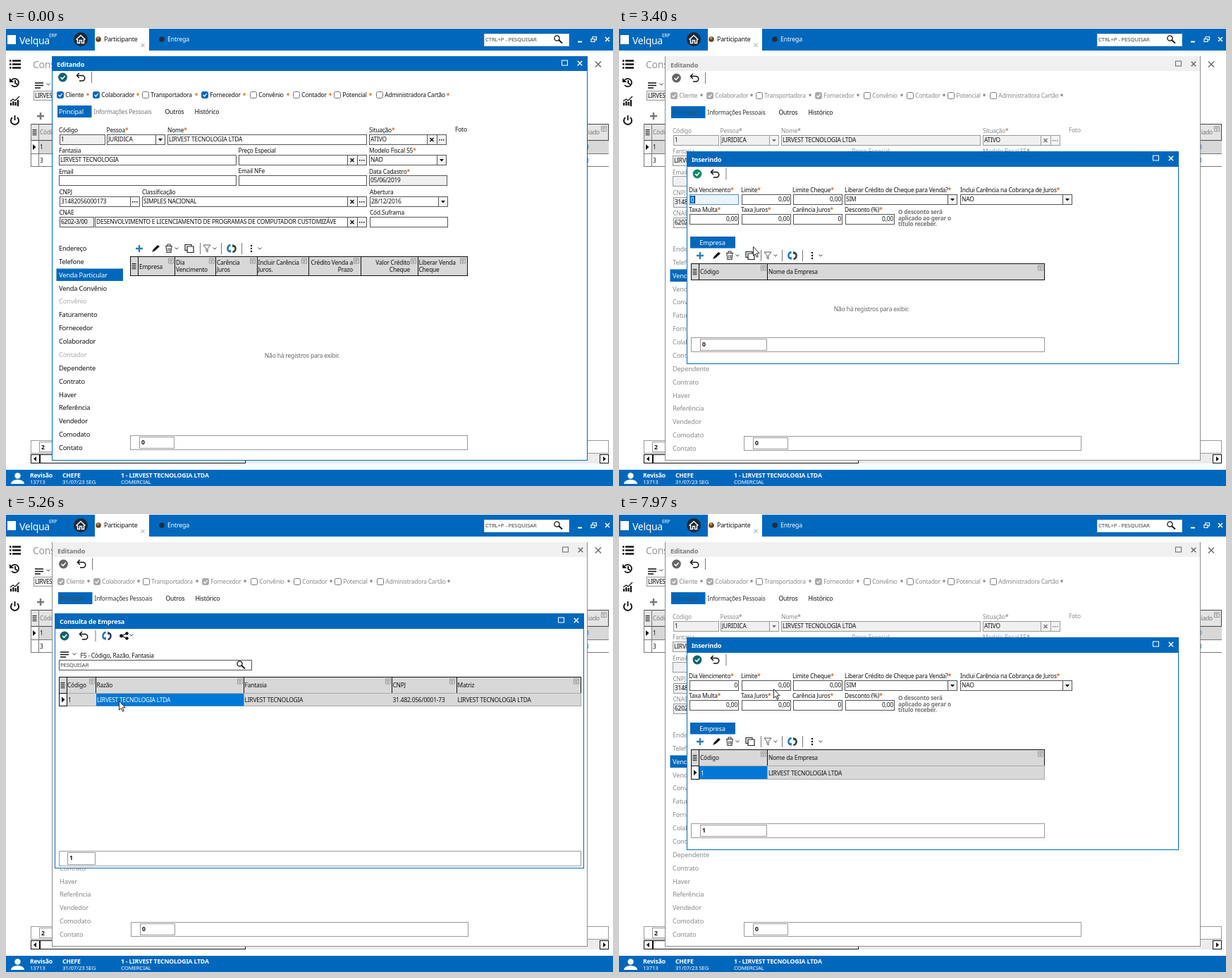
Recreate the animation shown at these times as an HTML page. Size 861 px wide and 650 px high, loop 8000 ms.

```html
<!DOCTYPE html>
<html lang="pt-BR">
<head>
<meta charset="utf-8">
<title>ERP</title>
<style>
html, body { margin: 0; width: 100%; height: 100%; overflow: hidden; background: #fff; }
svg { display: block; width: 861px; height: 650px; }
text { font-family: "Noto Sans", sans-serif; letter-spacing: -.022em; white-space: pre; }
</style>
</head>
<body>
<svg id="stage" viewBox="0 0 861 650" xmlns="http://www.w3.org/2000/svg"></svg>
<script>
const BLUE = '#0068bc', INK = '#111', GREY = '#8a8a8a', HEAD = '#d8d8d8';
const COMPANY = 'LIRVEST TECNOLOGIA', FULL = COMPANY + ' LTDA';

// ---- primitives ----
function text(x, y, s, { size = 8.4, fill = INK, bold = 0, anchor = 'start', star = '#d4691e' } = {}) {
  const body = s.replace(/\*$/, `<tspan fill="${star}" font-weight="700">*</tspan>`);
  return `<text x="${x}" y="${y}" font-size="${size}" fill="${fill}" font-weight="${bold ? 700 : 400}" text-anchor="${anchor}">${body}</text>`;
}
const fillBox = (x1, y1, x2, y2, fill) =>
  `<rect x="${x1}" y="${y1}" width="${x2 - x1}" height="${y2 - y1}" fill="${fill}"/>`;
const box = (x1, y1, x2, y2, stroke = '#555', fill = '#fff', r = 0) =>
  `<rect x="${x1 + .5}" y="${y1 + .5}" width="${x2 - x1 - 1}" height="${y2 - y1 - 1}" rx="${r}" fill="${fill}" stroke="${stroke}"/>`;
const line = (d, stroke = INK, w = 1) => `<path d="${d}" fill="none" stroke="${stroke}" stroke-width="${w}"/>`;
const shape = (d, fill = INK) => `<path d="${d}" fill="${fill}"/>`;
const dot = (x, y, r, fill) => `<circle cx="${x}" cy="${y}" r="${r}" fill="${fill}"/>`;
const at = (x, y, s, opacity = 1) => `<g transform="translate(${x} ${y})" opacity="${opacity}">${s}</g>`;

// ---- icons, centred on x, y ----
const cross = (x, y, r, c = INK, w = 1.5) => line(`M${x - r} ${y - r}l${2 * r} ${2 * r}m0 ${-2 * r}l${-2 * r} ${2 * r}`, c, w);
const chevron = (x, y) => line(`M${x - 2.5} ${y - 1.5}l2.5 2.5 2.5-2.5`, '#444');
const plus = (x, y, c, r = 5) => line(`M${x - r} ${y}h${2 * r}M${x} ${y - r}v${2 * r}`, c, 2.4);
const sep = (x, y, h = 16) => line(`M${x + .5} ${y - h / 2}v${h}`, '#777');
const lens = (x, y) => at(x, y, `<circle cx="-1.5" cy="-1.5" r="3.6" fill="none" stroke="${INK}" stroke-width="1.3"/>` + line('M1 1l5 4.5', INK, 1.8));
const menu = (x, y) => line(`M${x} ${y}h12M${x} ${y + 3.5}h12M${x} ${y + 7}h8`, INK, 1.6);
const check = (x, y, c) => dot(x, y, 6.4, c) + line(`M${x - 3} ${y}l2.3 2.3 4-4.3`, '#fff', 1.5);
const undo = (x, y) => at(x, y, line('M-5-2.5H2a3.5 3.5 0 0 1 0 7.5H-2', INK, 1.5) + line('M-2.2-6l-3.3 3.5 3.3 3.5', INK, 1.5));
const funnel = (x, y) => line(`M${x - 3.5} ${y - 3.5}h7v7h-7zM${x - 2} ${y - 1.5}h4l-2 2v2z`, '#888', .8);
const rowMark = (x, y) => line(`M${x - 3} ${y - 3.5}h6m-6 2.4h6m-6 2.4h6m-6 2.4h6`, INK);
const pointer = (x, y) => shape(`M${x - 2} ${y - 4}l4.5 4-4.5 4z`);
const refresh = (x, y, on = 1) => at(x, y,
  line('M-1.5-5A5 5 0 0 0-3 4.3', on ? '#1b6fb5' : '#555', 2.3) + line('M1.5 5A5 5 0 0 0 3-4.3', on ? '#23384d' : '#555', 2.3) +
  shape('M-6 2.5l5-.5-.5 4.5z', on ? '#1b6fb5' : '#555') + shape('M6-2.5l-5 .5.5-4.5z', on ? '#23384d' : '#555'));

function tools(x, y, hot) {
  return at(x, y,
    (hot ? `<g id="${hot}">${fillBox(-12, -8, 12, 8, '#1b4f83')}</g>` : '') +
    plus(0, 0, '#2b7cbc') +
    shape('M18 5l2-4 6-6 3 2-6.5 6z') +
    line('M37-3.5h10M40-4v-2h4v2M38-3l1 8.5h6L46-3M41-1v5M43.5-1v5', '#333', 1.1) + chevron(53, 0) +
    line('M68.5 2.5h-3.5v-8h9v2.5', '#222', 1.2) + line('M68-3h9v8.5h-9z', '#222', 1.2) +
    sep(86, 0) + line('M91-5h10l-4 5v5l-2-1.5V0z', '#555') + chevron(107, 0) + sep(116, 0) +
    refresh(131, 0) + sep(145, 0) +
    [-4, 0, 4].map(v => dot(159, v, 1.2, INK)).join('') + chevron(171, 0));
}

// ---- widgets ----
const button = (x1, y, x2, c) => box(x1, y, x2, y + 15, c, '#f4f4f4');
function field(x1, y, x2, value = '', kind = '', on = true) {
  const c = on ? '#555' : '#999', ink = on ? INK : '#777';
  let s = box(x1, y, x2, y + 15, c, on && kind !== 'locked' ? '#fff' : '#f0f0f0');
  if (kind === 'num') return s + text(x2 - 2, y + 10.3, value, { anchor: 'end' });
  s += text(x1 + 2, y + 10.3, value);
  if (kind === 'combo') s += button(x2 - 14, y, x2, c) + shape(`M${x2 - 10} ${y + 6}h6l-3 3.5z`, ink);
  if (kind === 'pick' || kind === 'dots') {
    s += button(x2 - 14, y, x2, c) + [-3, 0, 3].map(v => fillBox(x2 - 8 + v, y + 7, x2 - 6.5 + v, y + 8.5, ink)).join('');
    if (kind === 'pick') s += button(x2 - 28, y, x2 - 13, c) + cross(x2 - 21, y + 7.5, 2.5, ink);
  }
  return s;
}
function dialog(x1, y1, x2, y2, bar, title, on) {
  const c = on ? '#fff' : '#666', d = on ? 0 : 1;
  return box(x1, y1, x2, y2, on ? BLUE : '#8c8c8c') +
    fillBox(x1 + 1, y1, x2 - 1, y1 + bar, on ? BLUE : '#f0f0f0') +
    at(d, d, text(x1 + 7, y1 + 15, title, { size: 9.2, bold: 1, fill: on ? '#fff' : '#7a7a7a' }) +
      box(x2 - 37, y1 + 5.5, x2 - 28, y1 + 13.5, c, 'none') + cross(x2 - 11, y1 + 10, 3.2, c));
}
function header(x1, y1, x2, y2, cols, filters) {
  const lines = cols.map(x => `M${x + .5} ${y1}V${y2}`).join('');
  return box(x1, y1, x2, y2, INK, HEAD) + line(lines) + rowMark(x1 + 5.5, (y1 + y2) / 2) +
    filters.map(x => funnel(x, y1 + 6.5)).join('');
}
const footer = (x1, y1, x2, y2, a, b, n) => box(x1, y1, x2, y2, '#999') +
  (n ? box(a, y1 + 2, b, y2 - 2, '#999') + text(a + 3, y1 + 13.4, n, { bold: 1, size: 8.6 }) : '');
const empty = (x, y) => text(x, y, 'Não há registros para exibir.', { size: 8.5, fill: '#666', anchor: 'middle' });

// ---- main window ----
function desktop() {
  const w = { fill: '#fff' };
  const top = fillBox(0, 1, 861, 32, BLUE) + fillBox(2, 10, 14, 23, '#fff') +
    text(19, 22.5, 'Velqua', { size: 14, fill: '#fff' }) + text(61, 12.5, 'ERP', { size: 6.6, fill: '#fff' }) +
    dot(106, 16, 10, '#1d2935') + line('M99.5 16.5l6.5-6 6.5 6M101.5 16v5.5h3v-4h3v4h3V16', '#fff', 1.5) +
    fillBox(126, 1, 203, 32, '#fff') + dot(131, 16, 3.8, '#6b4219') + dot(130.5, 14.5, 1.8, '#c98a3a') +
    text(139, 19, 'Participante', { size: 8.8 }) + cross(194, 24.5, 2.5, '#999', 1) +
    dot(221, 16, 3.8, '#232c3c') + text(229, 19, 'Entrega', { size: 8.8, fill: '#fff' }) +
    box(678, 8, 799, 26, '#c8d8e8') + text(680, 19, 'CTRL+P - PESQUISAR', { size: 7.8, fill: '#444' }) + lens(783, 16) +
    line('M811 19.5h6', '#fff', 2) + line('M830 15.5h5v4h-5zM832 15v-2.5h5.5v4.5h-2', '#fff', 1.2) + cross(853, 16, 3, '#fff');
  const side = [46.5, 51.5, 56.5].map(y => line(`M5 ${y}h2.5m1.5 0h12`, INK, 2.6)).join('') +
    line('M8 74a5.6 5.6 0 1 1 0 7M13 74v4l3 2', INK, 1.8) + shape('M5 71v6h6z') +
    line('M7 110v-4m3.3 4v-6m3.3 6v-5m3.3 6V102', INK, 2.2) + line('M6 104l4-3 3 2 6-6', INK, 1.3) +
    line('M9 127a5.6 5.6 0 1 0 7 0M12.5 124v7', INK, 1.9);
  const grid = text(38, 57, 'Consulta', { size: 14, fill: '#999' }) + menu(41, 78) + chevron(60, 80) +
    box(39, 89, 80, 103, '#999', '#f4f4f4') + text(41, 99, FULL, { size: 8 }) + plus(49, 125, '#777') +
    box(35, 136, 855, 160, '#444', '#e4e4e4') + line('M46.5 136v61M35.5 136v61M35 178.5h820M35 196.5h820', '#777') +
    fillBox(47, 160, 855, 178, HEAD) + rowMark(40.5, 148) + text(48, 151, 'Código', { fill: '#777' }) +
    text(842, 151, 'Associado', { fill: '#777', anchor: 'end' }) + funnel(848, 143) +
    pointer(40, 169) + text(48, 172, '1') + text(48, 191, '3') +
    text(822, 172, '0', { fill: BLUE }) + text(822, 191, '0', { fill: BLUE }) + cross(840, 51.5, 4, '#666', 1.4) +
    footer(35, 585, 855, 604, 47, 90, '2') +
    fillBox(35, 604, 855, 618, '#ececec') + box(35, 605, 48, 618, INK) + box(48, 605, 340, 618, INK) +
    shape('M43 608v7l-4-3.5z') + box(842, 605, 855, 618, INK) + shape('M847 608v7l4-3.5z');
  const status = fillBox(0, 627, 861, 650, BLUE) + dot(16.5, 635.5, 4.2, '#fff') + shape('M7 647c0-8 19-8 19 0z', '#fff') +
    [[34, 'Revisão', '13713'], [80, 'CHEFE', '31/07/23 SEG'], [163, '1 - ' + FULL, 'COMERCIAL']].map(([x, a, b]) =>
      text(x, 637.5, a, { ...w, bold: 1, size: 8.7 }) + text(x, 647, b, { ...w, size: 7.9 })).join('');
  return top + side + grid + status;
}

// ---- "Editando" ----
const NAV = ('Endereço,Telefone,Venda Particular,Venda Convênio,Convênio,Faturamento,Fornecedor,Colaborador,' +
  'Contador,Dependente,Contrato,Haver,Referência,Vendedor,Comodato,Contato').split(',');
function editor(on) {
  const fill = on ? INK : GREY, star = on ? '#d4691e' : '#a98c78';
  const label = (x, y, s) => text(x, y, s, { fill: on ? INK : GREY, star });
  const f = (x1, y, x2, v, k) => field(x1, y, x2, v, k, on);
  const flags = [[77, 'Cliente', 1, 116], [128, 'Colaborador', 1, 187], [198, 'Transportadora', 0, 270], [282, 'Fornecedor', 1, 338],
    [351, 'Convênio', 0, 400], [412, 'Contador', 0, 460], [470, 'Potencial', 0, 517], [530, 'Administradora Cartão', 0, 627]]
    .map(([x, s, sel, sx]) => box(x - 5, 90, x + 5, 100, sel ? (on ? BLUE : '#aaa') : '#777', sel ? (on ? BLUE : '#aaa') : '#fff', 2) +
      (sel ? line(`M${x - 2.5} 95l2 2 3.2-3.8`, '#fff', 1.2) : '') + label(x + 7.3, 98.3, s) +
      text(sx, 98.5, '*', { anchor: 'middle', star: on ? '#d4691e' : '#777' })).join('');
  const nav = NAV.map((s, i) => text(75, 316 + i * 18.87, s, { size: 9.3,
    fill: i === 2 ? '#fff' : !on ? GREY : s === 'Convênio' || s === 'Contador' ? '#aaa' : INK })).join('');
  const cols = [[189, 342, 'Empresa'], [241, 336, 'Dia'], [241, 346, 'Vencimento'], [299, 336, 'Carência'], [299, 346, 'Juros'],
    [357.5, 336, 'Incluir Carência'], [357.5, 346, 'Juros.'], [492, 336, 'Crédito Venda a', 1], [492, 346, 'Prazo', 1],
    [573, 336, 'Valor Crédito', 1], [573, 346, 'Cheque', 1], [585.5, 336, 'Liberar Venda'], [585.5, 346, 'Cheque']]
    .map(([x, y, s, end]) => text(x, y, s, { anchor: end ? 'end' : 'start' })).join('');
  const body = check(80.5, 70, on ? '#12626d' : '#666') + undo(106, 70) + sep(121, 70) + flags +
    fillBox(73, 110, 121.5, 127, BLUE) + text(75, 122, 'Principal', { size: 9, fill: on ? '#fff' : '#3a4a5a' }) +
    text(124.5, 122, 'Informações Pessoais', { fill: on ? '#777' : '#333' }) + text(225.5, 122, 'Outros', { size: 8.7 }) + text(267.5, 122, 'Histórico', { size: 8.7 }) +
    [[75, 148, 'Código'], [142.5, 148, 'Pessoa*'], [229, 148, 'Nome*'], [515, 148, 'Situação*'], [637, 147, 'Foto'],
      [75, 177, 'Fantasia'], [329.5, 177, 'Preço Especial'], [515, 177, 'Modelo Fiscal 55*'], [75, 207, 'Email'], [329.5, 206, 'Email NFe'],
      [515, 207, 'Data Cadastro*'], [75.5, 236, 'CNPJ'], [193, 236, 'Classificação'], [516, 236, 'Abertura'], [75.5, 265, 'CNAE'],
      [516, 265, 'Cód.Suframa']].map(a => label(...a)).join('') +
    f(76, 151, 141, '1', 'locked') + f(143, 151, 226, 'JURIDICA', 'combo') + f(229, 151, 512, FULL) + f(515, 151, 625, 'ATIVO', 'pick') +
    f(75, 180, 327, COMPANY) + f(330, 180, 512, '', 'pick') + f(515, 180, 625, 'NAO', 'combo') +
    f(75, 209, 327) + f(330, 209, 512) + f(515, 209, 626, '05/06/2019', 'locked') +
    f(76, 239, 190, '31482056000173', 'dots') + f(193, 239, 512, 'SIMPLES NACIONAL', 'pick') + f(516, 239, 627, '28/12/2016', 'combo') +
    f(76, 268, 125, '6202-3/00', 'locked') + f(126, 268, 512, 'DESENVOLVIMENTO E LICENCIAMENTO DE PROGRAMAS DE COMPUTADOR CUSTOMIZÁVE', 'pick') + f(516, 268, 627) +
    fillBox(71.5, 341.5, 166, 359, BLUE) + nav + tools(189, 313, on ? 'hot1' : '') +
    header(176, 324, 655, 352, [187, 239, 297, 356, 429, 503, 584], [234, 292, 350, 423, 497, 578, 648]) + cols +
    empty(420, 468) + footer(176, 578, 655, 599, 189, 239, '0');
  return dialog(65, 40, 825, 614, 21, 'Editando', on) + at(on ? 0 : 1, on ? 0 : 1, body);
}

// ---- "Inserindo" ----
function insert(on, focus, row, tick) {
  const opt = { fill: on ? INK : GREY };
  const n = (x1, y, x2, v) => field(x1, y, x2, v, 'num', on);
  const first = focus
    ? box(100, 236, 170, 251, '#5f8fb5', '#eaf4fa') + fillBox(101, 238, 107.5, 249, '#0078d7') + text(102, 246.5, '0', { fill: '#fff' }) +
      `<g id="caret">${fillBox(107, 238, 108, 249, INK)}</g>`
    : n(100, 236, 170, '0');
  return dialog(96, 175, 794, 477, 22, 'Inserindo', on) +
    check(111, 207, on ? tick : '#666') + undo(136, 207) + sep(151.5, 207) +
    [[99, 233, 'Dia Vencimento*'], [173, 233, 'Limite*'], [246, 233, 'Limite Cheque*'], [320, 233, 'Liberar Crédito de Cheque para Venda?*'],
      [484, 233, 'Inclui Carência na Cobrança de Juros*'], [99, 261, 'Taxa Multa*'], [173, 261, 'Taxa Juros*'],
      [246, 261, 'Carência Juros*'], [320, 261, 'Desconto (%)*']].map(a => text(...a, opt)).join('') +
    first + n(174, 236, 244, '0,00') + n(247, 236, 317, '0,00') + field(320, 236, 480, 'SIM', 'combo', on) + field(484, 236, 643, 'NAO', 'combo', on) +
    n(100, 264, 170, '0,00') + n(174, 264, 244, '0,00') + n(247, 264, 317, '0') + n(321, 264, 391, '0,00') +
    ['O desconto será', 'aplicado ao gerar o', 'título receber.'].map((s, i) => text(396, 264 + i * 8.6, s, { size: 8.2, bold: 1, fill: '#777' })).join('') +
    fillBox(101, 296, 165, 312.5, BLUE) + text(132.5, 307.5, 'Empresa', { size: 9.2, fill: '#fff', anchor: 'middle' }) +
    tools(115, 323, focus ? 'hot2' : '') +
    header(102, 334, 604, 358, [113, 210], [205, 598]) + text(115, 349, 'Código') + text(212, 349, 'Nome da Empresa') +
    (row ? box(102, 357, 604, 377, '#aaa', HEAD) + box(102, 357, 114, 377, INK) + pointer(108, 367) + fillBox(114, 358, 210.5, 376, '#0078d7') +
      text(116, 370.5, '1', { fill: '#fff' }) + text(212, 370.5, FULL) : empty(358, 402)) +
    footer(102, 439, 604, 460, 115, 210, row ? '1' : '0');
}

// ---- "Consulta de Empresa" ----
function lookup(on) {
  return dialog(69, 141, 820, 503, 22, 'Consulta de Empresa', true) +
    check(83, 173, on ? '#12626d' : '#666') + undo(110, 173) + sep(126.5, 173) + refresh(143, 173, on) +
    line('M164 173l7-3.5M164 173l7 3.5', INK, 1.3) + dot(163.5, 173, 2.4, INK) + dot(171.5, 169.5, 2.2, INK) + dot(171.5, 176.5, 2.2, INK) + chevron(178, 172) +
    menu(77, 196) + chevron(97, 199) + text(105.5, 204, 'F5 - Código, Razão, Fantasia') +
    box(75, 207, 349, 222) + (on ? text(77, 217, 'PESQUISAR', { size: 7.8, fill: '#444' }) : fillBox(77, 209, 320, 220, '#f5f5f5')) + lens(333, 214) +
    header(75, 231, 816, 255, [86, 127, 337, 547, 639], [122, 332, 542, 633, 809]) +
    [[87, 'Código'], [128.5, 'Razão'], [338.5, 'Fantasia'], [548.5, 'CNPJ'], [640.5, 'Matriz']].map(([x, s]) => text(x, 246, s)).join('') +
    (on ? box(75, 254, 816, 273, '#aaa', HEAD) + box(75, 254, 87, 273, INK) + pointer(81, 263.5) + fillBox(128, 255, 337.5, 272.5, '#0078d7') +
      text(88, 267, '1') + text(129, 267, FULL, { fill: '#fff' }) + text(338.5, 267, COMPANY) + text(548.5, 267, '31.482.056/0001-73') + text(640.5, 267, FULL)
      : empty(450, 370)) +
    footer(75, 478, 816, 500, 87, 127, on ? '1' : '');
}

// ---- scene ----
const layers = {
  base: desktop(), editOn: editor(true), editOff: editor(false),
  insFocus: insert(true, true, false, '#128a68'), insOff: insert(false, false, false), insRow: insert(true, false, true, '#12626d'),
  lookEmpty: lookup(false), lookRow: lookup(true),
  hint: box(159, 272, 209, 291, '#888') + text(184, 284.5, 'Taxa Multa', { anchor: 'middle', fill: '#444' }),
  arrow: `<path d="M.5.5V13.2L3.4 10.5 5.4 15.2 7.3 14.4 5.3 9.8H9.2Z" fill="#fff" stroke="#111" stroke-width=".9"/>`,
  busy: '<circle r="6" fill="none" stroke="#1f8ad8" stroke-width="4"/><path d="M0-6A6 6 0 0 1 6 0" fill="none" stroke="#5ab2ee" stroke-width="4"/>',
  beam: line('M-2-5.5h1.5l.5.5.5-.5H2M0-5V5M-2 5.5h1.5L0 5l.5.5H2')
};
document.getElementById('stage').innerHTML = Object.entries(layers).map(([id, s]) => `<g id="${id}">${s}</g>`).join('');
const el = id => document.getElementById(id);
const show = (id, v) => el(id).setAttribute('opacity', +v);
const ramp = (t, a, b) => Math.min(1, Math.max(0, (t - a) / (b - a)));
const ease = k => k * k * (3 - 2 * k);

const MOVES = [[500, 1300, 190, 310], [3400, 3750, 115, 320], [4800, 5260, 160, 265], [7410, 7970, 219, 248]];
function cursor(t) {
  let x = 325, y = 648;
  for (const [a, b, tx, ty] of MOVES) {
    const k = ease(ramp(t, a, b));
    x += (tx - x) * k;
    y += (ty - y) * k;
  }
  return [x, y];
}

function update(t) {
  const within = (a, b) => t >= a && t < b;
  const [x, y] = cursor(t);
  show('editOn', t < 1750);
  show('editOff', t >= 1750);
  show('hot1', within(1200, 1750));
  show('insFocus', within(1750, 3900) ? ramp(t, 1750, 1900) : 0);
  show('caret', !within(2450, 2950) && t < 3450);
  show('hot2', t >= 3650);
  show('insOff', within(3900, 6210));
  show('insRow', t >= 6210);
  show('lookEmpty', within(4250, 4350));
  show('lookRow', within(4350, 6110));
  show('hint', t < 7410 ? ramp(t, 6760, 6910) : 0);

  const busy = within(3950, 4450) || within(5860, 6260);
  const beam = t >= 6260 && y > 262;
  show('busy', busy);
  show('beam', beam);
  show('arrow', t >= 500 && !busy && !beam);
  el('arrow').setAttribute('transform', `translate(${x} ${y})`);
  el('beam').setAttribute('transform', `translate(${x + 1} ${y})`);
  el('busy').setAttribute('transform', `translate(${x} ${y + .5}) rotate(${t * .36})`);
}

const start = performance.now();
function frame() {
  update((performance.now() - start) % 8000);
  requestAnimationFrame(frame);
}
update(0);
requestAnimationFrame(frame);
</script>
</body>
</html>
```
